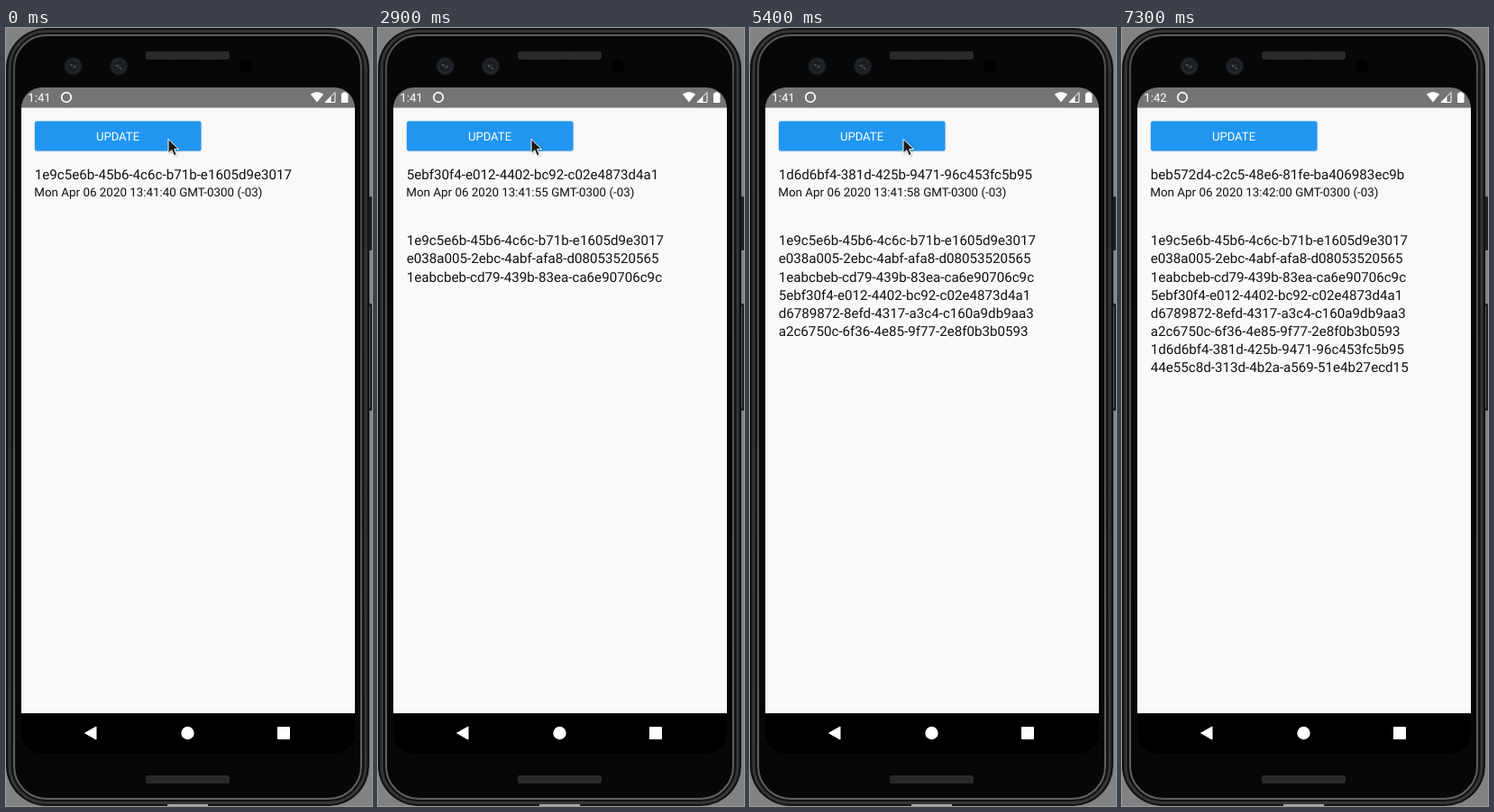
These frames come from a looping animation (406x864 px, 8.3 s). An HTML page:

```html
<!DOCTYPE html>
<html lang="en">
<head>
<meta charset="utf-8">
<title>Update list</title>
<style>
  html, body { margin: 0; width: 100%; height: 100%; overflow: hidden; background: #828282; }
  svg { display: block; width: 406px; height: 864px; }
  text { font-family: Roboto, sans-serif; fill: #111; text-rendering: geometricPrecision; white-space: pre; }
  .id { font-size: 15.15px; }
  .date { font-size: 13.4px; }
  .light { font-size: 13.2px; fill: #fff; }
</style>
</head>
<body>
<svg viewBox="0 0 406 864">
  <defs>
    <linearGradient id="metal" x2="0" y2="1">
      <stop offset="0" stop-color="#5c5c5c"/>
      <stop offset=".06" stop-color="#484848"/>
      <stop offset=".5" stop-color="#505050"/>
      <stop offset="1" stop-color="#606060"/>
    </linearGradient>
    <pattern id="mesh" width="3" height="3" patternUnits="userSpaceOnUse">
      <rect width="3" height="3" fill="#242424"/>
      <path d="M0 3L3 0" stroke="#3b3b3b" stroke-width=".8"/>
    </pattern>
    <radialGradient id="lens">
      <stop offset="0" stop-color="#2c3137"/>
      <stop offset=".45" stop-color="#16191d"/>
      <stop offset=".7" stop-color="#24272a"/>
      <stop offset="1" stop-color="#17191b"/>
    </radialGradient>
    <clipPath id="screen"><rect x="17" y="66" width="370" height="740" rx="23"/></clipPath>
    <clipPath id="face"><rect x="32" y="103.5" width="184.5" height="33" rx="2"/></clipPath>
    <filter id="soft" x="-10%" y="-30%" width="120%" height="160%"><feGaussianBlur stdDeviation="1"/></filter>
  </defs>

  <!-- phone body -->
  <g fill="#1f1f1f">
    <rect x="400" y="187" width="6" height="60" rx="1.5"/>
    <rect x="400" y="306" width="6" height="119" rx="1.5"/>
  </g>
  <path d="M403.5 309V422" stroke="#555"/>
  <rect x="0" y="0" width="403" height="864" rx="45" fill="#121212"/>
  <g fill="none">
    <rect x="4" y="3.5" width="395" height="857" rx="41" stroke="#363636" stroke-width="3"/>
    <rect x="9" y="8" width="385" height="848" rx="36" stroke="url(#metal)" stroke-width="2"/>
  </g>
  <rect x="10.5" y="9.5" width="382" height="845" rx="34.5" fill="#070706"/>
  <path d="M179 863H224" stroke="#a8a8a8" stroke-width="2"/>
  <g fill="url(#mesh)">
    <rect x="155" y="26" width="93" height="9" rx="2"/>
    <rect x="155" y="830" width="93" height="9" rx="2"/>
  </g>
  <g fill="url(#lens)">
    <circle cx="74.5" cy="42.5" r="10"/>
    <circle cx="125" cy="42.5" r="10"/>
  </g>
  <path d="M71 40l2 2M76 44l2-2M122 41l2 2M126 44l2 2" stroke="#566069" stroke-width="1.2"/>
  <circle cx="266" cy="43" r="7" fill="#000"/>

  <!-- screen -->
  <g clip-path="url(#screen)">
    <rect x="17" y="66" width="370" height="22.4" fill="#757474"/>
    <rect x="17" y="88.4" width="370" height="672.6" fill="#f9f9f8"/>
    <rect x="17" y="761" width="370" height="45" fill="#000"/>
  </g>
  <text class="light" id="clock" x="24.3" y="82"></text>
  <circle cx="67" cy="77" r="5.3" fill="none" stroke="#fff" stroke-width="1.7"/>
  <g fill="#fff">
    <path d="M337.8 73.6Q345 68.4 352.2 73.6L345 82.5Z"/>
    <path d="M354 82.5L365 71.5V82.5Z" fill="none" stroke="#fff"/>
    <path d="M354 82.5L360.5 76V82.5Z"/>
    <path d="M372 72.5h2v-1.3h3.5v1.3h2V83H372Z"/>
    <path d="M87.5 783L100 776V790Z" stroke="#fff" stroke-linejoin="round"/>
    <circle cx="201.5" cy="783" r="7.2"/>
    <rect x="301" y="776" width="14" height="14" rx="1"/>
  </g>

  <!-- content -->
  <rect x="31.7" y="104" width="185" height="33" rx="2" fill="#246" opacity=".25" filter="url(#soft)"/>
  <rect x="32" y="103.5" width="184.5" height="33" rx="2" fill="#2196f0"/>
  <text class="light" x="124" y="125.2" text-anchor="middle" style="font-size:13.1px">UPDATE</text>
  <g clip-path="url(#face)"><circle id="ripple" cy="124" opacity=".1"/></g>
  <text class="id" id="current" x="31.7" y="167.8"></text>
  <text class="date" id="date" x="31.3" y="186.8"></text>
  <g id="history"></g>
  <g id="cursor">
    <path d="M1 1.5V18l4-3.5 3 6 3-1.3-3-6h5Z" fill="#000" opacity=".25" filter="url(#soft)"/>
    <path d="M.5 .8V16.6L4.3 13.2 6.9 19.3 9.7 18.1 7.2 12.1H12Z" fill="#1c1c1c" stroke="#fff"/>
  </g>
</svg>
<script>
  const LOOP = 8300, STEP = 100;
  const ids = [
    '1e9c5e6b-45b6-4c6c-b71b-e1605d9e3017',
    'e038a005-2ebc-4abf-afa8-d08053520565',
    '1eabcbeb-cd79-439b-83ea-ca6e90706c9c',
    '5ebf30f4-e012-4402-bc92-c02e4873d4a1',
    'd6789872-8efd-4317-a3c4-c160a9db9aa3',
    'a2c6750c-6f36-4e85-9f77-2e8f0b3b0593',
    '1d6d6bf4-381d-425b-9471-96c453fc5b95',
    '44e55c8d-313d-4b2a-a569-51e4b27ecd15',
    'beb572d4-c2c5-48e6-81fe-ba406983ec9b'
  ];
  const updates = [500, 1500, 2500, 3500, 4500, 5400, 6300, 7200];
  // press start, end, widest ripple radius
  const presses = [
    [300, 500, 12], [1300, 1500, 70], [2300, 2500, 70], [3300, 3500, 9],
    [4100, 4300, 70], [5100, 5200, 70], [6000, 6300, 70], [6900, 7200, 70]
  ];
  const $ = id => document.getElementById(id);
  const pad = n => String(n).padStart(2, '0');

  const rows = ids.slice(0, -1).map((id, i) => {
    const row = document.createElementNS('http://www.w3.org/2000/svg', 'text');
    row.setAttribute('class', 'id');
    row.setAttribute('x', 31.7);
    row.setAttribute('y', 241.2 + i * 20.18);
    row.textContent = id;
    return $('history').appendChild(row);
  });

  function render(t) {
    const n = updates.filter(u => u <= t).length;
    const sec = n ? 52 + n : 40;
    const min = 41 + Math.floor(sec / 60);
    $('clock').textContent = `1:${min}`;
    $('current').textContent = ids[n];
    $('date').textContent = `Mon Apr 06 2020 13:${min}:${pad(sec % 60)} GMT-0300 (-03)`;
    rows.forEach((row, i) => row.setAttribute('visibility', i < n ? 'visible' : 'hidden'));

    const x = t < 2800 ? 179.5 : t < 2900 ? 174.5 : 169.5;
    $('cursor').setAttribute('transform', `translate(${x} 122.5)`);
    $('cursor').setAttribute('visibility', t < 7300 ? 'visible' : 'hidden');

    const press = presses.find(([a, b]) => t >= a && t < b);
    const r = press ? press[2] * (t - press[0] + STEP) / (press[1] - press[0]) : 0;
    $('ripple').setAttribute('cx', x);
    $('ripple').setAttribute('r', r);
  }

  const start = performance.now();
  let last = -1;
  function tick() {
    const t = Math.floor((performance.now() - start) % LOOP / STEP) * STEP;
    if (t !== last) render(last = t);
    requestAnimationFrame(tick);
  }
  tick();
</script>
</body>
</html>
```
